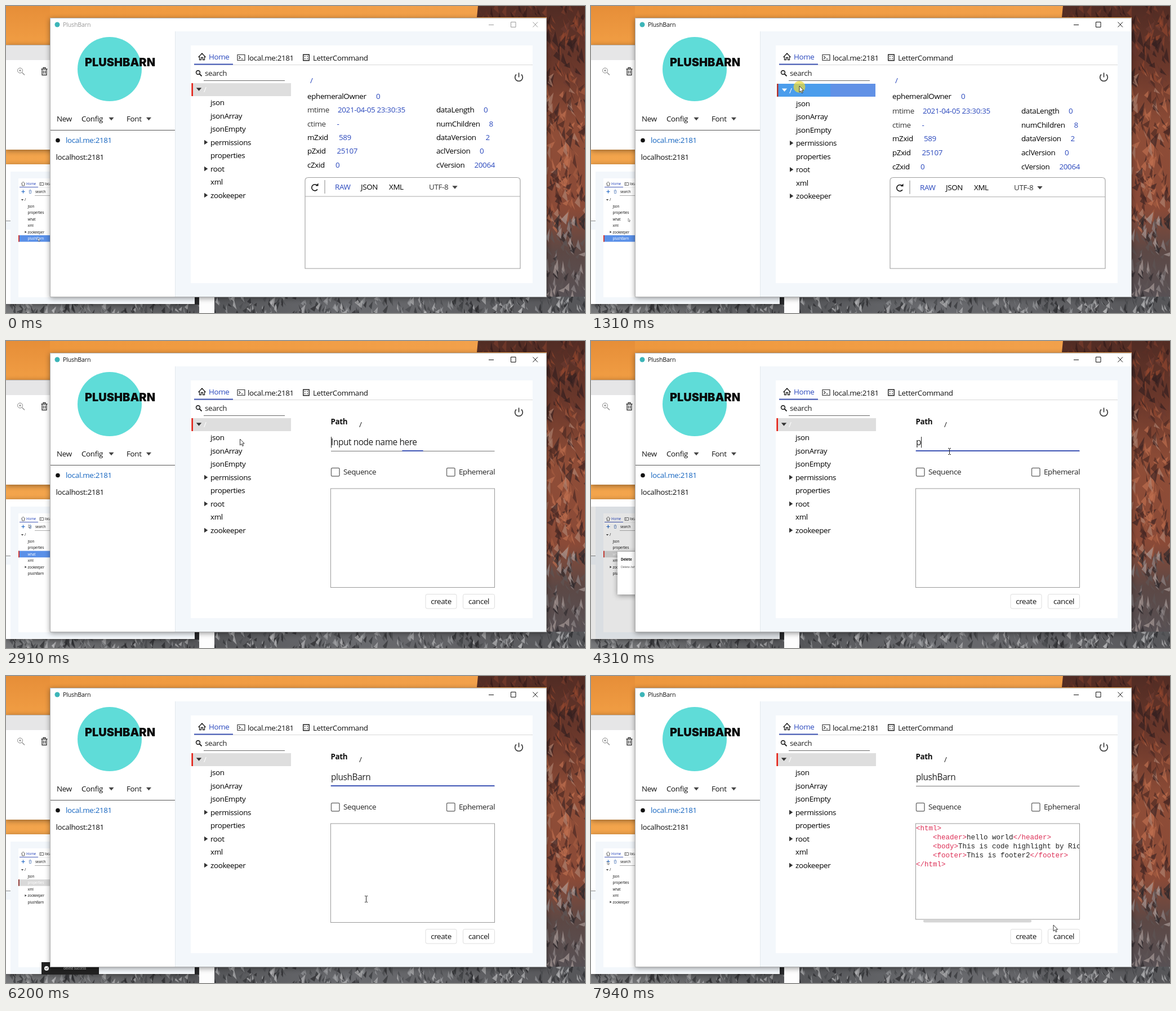
Recreate the animation shown at these times as an HTML page. Size 1028x545 px, loop 8000 ms.

```html
<!DOCTYPE html>
<html lang="en">
<head>
<meta charset="utf-8">
<title>Node browser</title>
<style>
  html, body { margin: 0; width: 100%; height: 100%; overflow: hidden; background: #fff; }
  svg { display: block; font-family: "Open Sans", "Noto Sans", sans-serif; }
  text { white-space: pre; }
  .ui { font-size: 13.4px; letter-spacing: -.35px; }
  .field { font-size: 15.4px; letter-spacing: -.4px; }
  .mini { font-size: 6.3px; letter-spacing: -.16px; }
  .code { font: 12.5px "Liberation Mono", "DejaVu Sans Mono", monospace; }
  .shadow { filter: drop-shadow(0 2px 5px rgba(0, 0, 0, .4)); }
</style>
</head>
<body>
<svg id="stage" width="1028" height="545" viewBox="0 0 1028 545"></svg>
<script>
const LOOP = 8000;
const NAME = 'PlushBarn';
const WORD = 'plushBarn';
const BLUE = '#2a48bd';
const ACCENT = '#3f55b5';
const INK = '#111';

// Markup helpers; y is the middle of the line of text
const rect = (x, y, w, h, fill, more = '') =>
  `<rect x="${x}" y="${y}" width="${w}" height="${h}" fill="${fill}" ${more}/>`;
const text = (x, y, s, fill = INK, cls = 'ui', more = '') =>
  `<text x="${x}" y="${y + (cls === 'mini' ? 2.3 : 4.8)}" class="${cls}" fill="${fill}" ${more}>${s}</text>`;
const line = (d, stroke = INK, width = 1, more = '') =>
  `<path d="${d}" fill="none" stroke="${stroke}" stroke-width="${width}" ${more}/>`;
const shape = (d, fill = INK, more = '') => `<path d="${d}" fill="${fill}" ${more}/>`;
const group = (id, body, more = '') => `<g id="${id}" ${more}>${body}</g>`;
const gradient = (id, dir, stops) =>
  `<linearGradient id="${id}" ${dir}>${stops.map(([o, c]) =>
    `<stop offset="${o}" stop-color="${c}"/>`).join('')}</linearGradient>`;
const down = (x, y, s, fill = '#444') => shape(`M${x - s} ${y - s / 2}h${2 * s}l${-s} ${s * 1.2}z`, fill);
const right = (x, y, s) => shape(`M${x} ${y - s}v${2 * s}l${s * 1.5} ${-s}z`, '#333');

let seed = 11;
const rnd = () => (seed = (seed * 16807) % 2147483647) / 2147483647;

// Slanted rock shards inside a box
function shards(x, y, w, h, count, size, tones) {
  let out = '';
  for (let i = 0; i < count; i++) {
    const px = x + rnd() * w, py = y + rnd() * h;
    const a = size * (rnd() - .35), b = size * (.5 + rnd());
    const c = size * (.2 + rnd() * .4);
    out += shape(`M${px.toFixed(1)} ${py.toFixed(1)}l${a.toFixed(1)} ${b.toFixed(1)}` +
      `l${(-c).toFixed(1)} ${(-b * .4).toFixed(1)}z`,
      tones[Math.floor(rnd() * tones.length)], 'opacity=".65"');
  }
  return out;
}

function backdrop() {
  return `<defs>
    ${gradient('sky', 'x2="1" y2="0"', [[0, '#ec963d'], [.3, '#f09b41'], [.85, '#f2a14c']])}
    ${gradient('glow', 'x2="0" y2="1"', [[0, '#e68e38'], [.2, '#ef9b42'], [1, '#f3a54d']])}
    ${gradient('cliff', 'x2="0" y2="1"', [[0, '#512c24'], [.2, '#6b382b'], [.4, '#8f4d37'],
      [.66, '#8a4a37'], [.8, '#5c4845'], [1, '#56545a']])}
    ${gradient('stone', 'x2="1" y2="0"', [[0, '#77787a'], [.35, '#545558'], [.6, '#6a6b6f'], [1, '#565659']])}
    <clipPath id="rocks"><path d="M838 0H1028V545H960V20H836z"/></clipPath>
    <clipPath id="floor"><path d="M0 516H1028V545H0z"/></clipPath>
    <clipPath id="area"><path d="M577 262H867V432H577z"/></clipPath>
    <clipPath id="rootRow"><path d="M332 138H505V161H332z"/></clipPath>
  </defs>` +
  rect(0, 0, 1028, 545, 'url(#sky)') +
  rect(0, 0, 78, 290, 'url(#glow)') +
  `<g clip-path="url(#rocks)">` + rect(830, 0, 198, 545, 'url(#cliff)') +
    shards(835, -10, 190, 30, 60, 16, ['#30191a', '#7a3c2b', '#5b2e25']) +
    shards(950, 10, 90, 120, 70, 20, ['#331f20', '#93472f', '#6b3a31']) +
    shards(950, 110, 90, 270, 190, 20, ['#4a2823', '#c07050', '#a65c41', '#3b2424', '#b08472']) +
    shards(950, 365, 90, 180, 130, 17, ['#2c282b', '#8f8788', '#5d5455', '#aa9c99']) + '</g>' +
  `<g clip-path="url(#floor)">` + rect(0, 516, 1028, 29, 'url(#stone)') +
    shards(0, 508, 1040, 34, 460, 13, ['#232427', '#9a9b9e', '#bcbcbd', '#47484b', '#2e2f32']) + '</g>' +
  rect(343, 510, 27, 35, '#fdfdfd') + rect(335, 510, 8, 20, '#2a2b2d');
}

function rearWindows() {
  return rect(0, 69, 90, 186, '#fff', 'class="shadow"') + rect(0, 69, 90, 27, '#e6e6e7') +
    line('M0 69.5H78', '#bbb') +
    `<circle cx="25" cy="114.500" r="4.500" fill="none" stroke="#888"/>` +
    line('M28.500 118L33 122.500M23 114.500H27M25 112.500V116.500', '#888', 1.1) +
    line('M62.500 112H73.500M66 111V109.500H70V111M64 112V122.500H72V112M66.500 114.500V120M69.500 114.500V120', '#333', 1.3) +
    rect(0, 281, 335, 248, '#fff', 'class="shadow"') +
    rect(8, 294, 327, 234, '#f3f7fb') + rect(22, 306, 290, 211, '#fff') +
    line('M0 381.500H8', '#888') + rect(0, 382, 8, 15, '#f3f7fb') +
    line('M27 315.500L30.500 312L34 315.500M28.500 315V319H32.500V315', '#333', .8) +
    text(36, 315.5, 'Home', BLUE, 'mini') + line('M24 321.500H57', ACCENT, 1) +
    line('M57 322H78', '#ddd', .6) +
    line('M60 313.500H66.500V318.500H60zM61.500 315L63 316L61.500 317', '#333', .7) +
    text(69, 316, 'local', INK, 'mini') +
    line('M27.500 329.500H33.500M30.500 326.500V332.500', '#2368c4', 1.2) +
    line('M40.500 328H45.500M41.500 328V332.500H44.500V328M42 326.500H44', '#6d8fc4', .9) +
    text(52, 329.5, 'search', INK, 'mini') + line('M51 336.500H78', '#777', .6) +
    down(29, 344, 2.2) + text(33, 344, '/', INK, 'mini') +
    group('miniRows', '') +
    group('dim', rect(0, 294, 335, 235, '#000', 'opacity=".1"') +
      rect(47, 374, 120, 76, '#fff', 'class="shadow"') +
      text(53, 388, 'Delete', INK, 'mini', 'font-weight="700"') +
      text(53, 401, 'Delete /what', '#555', 'mini', 'style="font-size:5.5px"')) +
    group('toast', rect(63, 508, 102, 22, '#222') +
      '<circle cx="72" cy="519" r="4" fill="#fff"/>' + line('M70 519L71.500 520.500L74 517.500', '#222') +
      text(102, 519, 'delete success', '#ddd', 'mini')) +
    group('miniClick', '<circle r="5.500" fill="#f2dc32" opacity=".75"/>') +
    group('miniArrow', arrow('scale(.5)'));
}

function arrow(transform = '') {
  return `<path d="M0 0V11L2.600 8.700L4.300 12.600L6.100 11.800L4.400 8H7.700z" fill="#fff" stroke="#222"
    stroke-width=".9" transform="${transform}"/>`;
}

const tree = ['json', 'jsonArray', 'jsonEmpty', '+permissions', 'properties', '+root', 'xml', '+zookeeper'];
const leftStats = [['mtime', '2021-04-05 23:30:35', 589], ['ctime', '-', 587.5], ['mZxid', '589', 591],
  ['pZxid', '25107', 587.5], ['cZxid', '0', 585]];
const rightStats = [['dataLength', '0', 848], ['numChildren', '8', 857.5], ['dataVersion', '2', 851.5],
  ['aclVersion', '0', 841], ['cVersion', '20064', 831.5]];

function chrome() {
  return rect(78, 21, 882, 496, '#fff', 'class="shadow"') +
    rect(301, 45, 659, 472, '#f3f7fb') + line('M300.500 45V517', '#e3e8ed') +
    line('M78.500 21.500H959.500V516.500H78.500z', '#8c8c8c', .7) +
    '<circle cx="91" cy="33" r="4.500" fill="#3cb5b8"/>' +
    group('title', text(101, 32, NAME, 'currentColor', '', 'font-size="10.600" letter-spacing="-.15"') +
      line('M857 33.500H866M896.500 28.500H905V37.500H896.500zM935.500 28.500L944 37.500M944 28.500L935.500 37.500', 'currentColor')) +
    '<circle cx="184" cy="112" r="57" fill="#5fdcd8"/>' +
    `<text x="202.500" y="107" text-anchor="middle" font-family="Inter, sans-serif" font-weight="900"
      font-size="20" fill="#0b0b0b">${NAME.toUpperCase()}</text>` +
    text(90, 200, 'New') + text(134, 200, 'Config') + down(187, 200, 4.5) +
    text(214, 200, 'Font') + down(253.5, 200, 4.5) + line('M79 220.500H300', '#555') +
    '<circle cx="92" cy="238.500" r="3.800" fill="#111"/>' +
    text(106, 238.5, 'local.me:2181', '#1565c0') + text(88.5, 268.5, 'localhost:2181') +
    rect(328, 70, 607, 422, '#fff') + line('M334 104.500H935', '#d9d9d9') + line('M334 103.500H403', ACCENT, 2) +
    line('M341.500 91L348 84L354.500 91M343.500 89.500V95.500H346.500V91.500H349.500V95.500H352.500V89.500', '#222', 1.3) +
    text(360, 90, 'Home', BLUE) +
    line('M411 86.500H424V96.500H411zM413.500 89L416 91.500L413.500 94M417.500 94H421', '#333', 1.2) +
    text(429, 92, 'local.me:2181') +
    line('M527.800 86.300H538.200V96.700H527.800z', '#222', 1.5) +
    line('M530 89.500H536M530 93.500H536', '#222', 1.6, 'stroke-dasharray="1.600 2.600"') +
    text(545, 92, 'LetterCommand') +
    '<circle cx="341" cy="118" r="3.400" fill="none" stroke="#222" stroke-width="1.600"/>' +
    line('M343.500 120.500L347.500 124.500', '#222', 1.9) +
    text(353, 119.5, 'search', '#222') + line('M351 132.500H495', '#666') +
    line('M906 121.500A6.800 6.800 0 1 0 915 121.500M910.500 118.500V126.500', '#444', 1.8);
}

function treeView() {
  return group('rootIdle', rect(330, 137, 176, 23, '#dedede') + rect(329.3, 137, 2.7, 23, '#e3241b')) +
    group('rootHot', rect(330, 138, 175, 23, '#6191e6') +
      '<g clip-path="url(#rootRow)"><rect id="ripple" x="332" y="138" height="23" fill="#4b9dec"/></g>' +
      rect(330, 138, 2.5, 23, '#b5332c')) +
    group('tree', '<g id="rootMark">' + down(342.5, 147.5, 4.7, 'currentColor') + '</g>' +
      text(351, 148.5, '/', '#fff') +
      tree.map((name, i) => {
        const y = 171.5 + 23.5 * i, open = name[0] === '+';
        return (open ? right(352, y, 4.2) : '') + text(363, y, name.replace('+', ''), '#000');
      }).join(''));
}

function details() {
  const stats = (list, x) => list.map(([label, value, vx], i) =>
    `<g data-row="${i}">` + text(x, 0, label, x < 600 && i < 2 ? '#333' : '#000') + text(vx, 0, value, BLUE) + '</g>').join('');
  return group('details', text(540, 132.5, '/', BLUE) +
    text(535, 160.5, 'ephemeralOwner', '#000') + text(657, 160.5, '0', BLUE) +
    stats(leftStats, 535) + stats(rightStats, 764) +
    line('M531 466V310Q531 304.500 537 304.500H907Q913 304.500 913 310V466z', '#9d9d9d', 1.1) +
    group('tools', line('M531 338H913', '#aaa') + line('M566 309V333', '#888') +
      line('M552.500 318.500A5.600 5.600 0 1 0 553 325.500', '#111', 1.6) +
      shape('M549.500 319.500H554.500V314.500z', '#111') +
      text(584, 321.5, 'RAW', BLUE) + text(630, 321.5, 'JSON', '#000') +
      text(680, 321.5, 'XML', '#000') + text(751, 321.5, 'UTF-8', '#333') + down(797, 321.5, 4.7)));
}

function form() {
  const box = x => rect(x, 225.5, 14.5, 14.5, '#fff', 'rx="2" stroke="#777" stroke-width="1.500"');
  const button = (x, w, s) => rect(x, 449.5, w, 25.5, '#fff', 'rx="3" stroke="#ddd"') +
    text(x + w / 2, 462.5, s, INK, 'ui', 'text-anchor="middle"');
  const tag = s => `<tspan fill="#dd2f56">${s.replace(/</g, '&lt;')}</tspan>`;
  const pad = '    ';
  const source = [tag('<html>'),
    pad + tag('<header>') + 'hello world' + tag('</header>'),
    pad + tag('<body>') + 'This is code highlight by RichTextFX' + tag('</body>'),
    pad + tag('<footer>') + 'This is footer2' + tag('</footer>'),
    tag('</html>')];
  return group('form', text(576.5, 143.5, 'Path', INK, 'ui', 'font-weight="700"') +
    text(627, 148.5, '/', '#222') +
    line('M577 195.500H867.500', '#777') + line('', ACCENT, 2, 'id="focus"') +
    text(577, 180.5, '', '#222', 'field', 'id="input"') +
    line('', '#222', 1, 'id="caret"') +
    box(577.5) + text(599, 232.5, 'Sequence', '#222') + box(782.5) + text(804, 232.5, 'Ephemeral', '#222') +
    rect(576.5, 262, 291, 175.5, '#fff', 'id="areaBox" stroke="#999"') +
    group('source', '<g clip-path="url(#area)">' + source.map((s, i) =>
      text(577, 270 + 16 * i - 1, s, '#222', 'code')).join('') + '</g>' +
      rect(590, 432.5, 192, 5, '#d6d6d6', 'rx="2.500"')) +
    button(745, 55, 'create') + button(811.5, 56, 'cancel'));
}

function overlays() {
  return group('menu', rect(370, 150, 87, 75, '#fff', 'class="shadow"') +
      line('M386.500 167.500H394M386.500 170.500H394M386.500 173.500H391M392.500 173.500H398.500M395.500 170.500V176.500', '#222', 1.3) +
      text(403.5, 170.5, 'add') +
      line('M388 200H397.500M391 199H394.500M389.500 201V209H396V201', '#222', 1.5) + text(403.5, 204.5, 'delete')) +
    group('click', '<circle r="10.500" fill="#ecd93a" opacity=".72"/>') +
    group('arrow', arrow()) +
    group('beam', line('M-2.500 -5.500H-.5M.5 -5.500H2.500M0 -5V5M-2.500 5.500H-.5M.5 5.500H2.500', '#222'));
}

const stage = document.getElementById('stage');
stage.innerHTML = backdrop() + rearWindows() + chrome() + treeView() + details() + form() + overlays();

const el = {};
stage.querySelectorAll('[id]').forEach(node => el[node.id] = node);
const statRows = [...stage.querySelectorAll('[data-row]')];

const show = (node, on) => node.style.display = on ? '' : 'none';
const move = (node, x, y) => node.setAttribute('transform', `translate(${x} ${y})`);
const clamp = v => Math.max(0, Math.min(1, v));
const within = (t, a, b) => t >= a && t < b;

// Eased position along [time, x, y] stops
function along(stops, t) {
  let i = 0;
  while (i < stops.length - 2 && t >= stops[i + 1][0]) i++;
  const [t0, x0, y0] = stops[i], [t1, x1, y1] = stops[i + 1];
  let k = clamp((t - t0) / (t1 - t0));
  k = k * k * (3 - 2 * k);
  return [x0 + (x1 - x0) * k, y0 + (y1 - y0) * k];
}

const pointer = [[750, 560, 300], [1270, 370, 142], [1700, 370, 142], [1900, 369, 150], [2190, 369, 150],
  [2540, 405, 168], [2760, 405, 168], [2900, 415.5, 174], [3070, 415.5, 174], [3700, 636, 196],
  [6040, 636, 196], [6200, 638.5, 396.5], [6500, 644, 384], [7250, 644, 384], [7710, 771, 397],
  [7790, 790, 412], [7940, 821, 442]];
const miniPointer = [[0, 57, 412], [450, 57, 412], [1230, 66, 377], [1800, 66, 377], [2050, 60, 377],
  [2270, 60, 377], [2850, 40, 326], [3850, 40, 326], [4250, 110, 436], [5500, 110, 436],
  [6910, 110, 400], [7700, 29, 329]];
const typedAt = [4310, 4470, 4630, 4790, 4910, 5030, 5180, 5260, 5410];

let miniKey = '';
function drawMini(t) {
  const removed = within(t, 5410, 6910), fresh = t >= 6910;
  const dialog = within(t, 3890, 5410);
  const names = ['json', 'properties', 'what', 'xml', '+zookeeper', WORD]
    .filter(n => !(removed && n === 'what') && !(fresh && n === WORD));
  const picked = fresh ? -1 : removed ? 1 : t < 2190 ? 5 : 2;
  const grey = removed || dialog;
  const key = [names.length, picked, grey, fresh].join();
  if (key !== miniKey) {
    miniKey = key;
    el.miniRows.innerHTML = names.map((name, i) => {
      const y = 355.5 + 11.45 * i, on = i === picked;
      return (on ? rect(22, y - 5.8, 60, 11.6, grey ? '#d9d9d9' : '#5a90e8') +
          rect(22, y - 5.8, 1.8, 11.6, removed ? '#8c2f2b' : '#d8322a') : '') +
        (name[0] === '+' ? right(33.5, y, 2) : '') +
        text(38.5, y, name.replace('+', ''), on ? '#fff' : INK, 'mini');
    }).join('');
  }
  show(el.dim, dialog);
  show(el.toast, within(t, 5500, 6750));
  const [x, y] = along(miniPointer, t);
  show(el.miniClick, within(t, 2080, 2270));
  move(el.miniClick, x, y);
  move(el.miniArrow, x, y);
}

function drawInput(t) {
  const count = typedAt.filter(at => t >= at).length;
  el.input.textContent = count ? WORD.slice(0, count) : 'Input node name here';
  const blink = within(t, 2830, 3330) || within(t, 3850, 5650) || within(t, 5880, 6120);
  const x = 577.5 + (count ? el.input.getComputedTextLength() : 0);
  el.caret.setAttribute('d', `M${x} 170V189.500`);
  show(el.caret, blink);
  const half = 145.3 * clamp((t - 2870) / 320);
  el.focus.setAttribute('d', `M${722 - half} 195H${722 + half}`);
  show(el.focus, within(t, 2870, 6480));
}

function draw(t) {
  const active = t >= 1310, editing = t >= 2830;
  const hot = active && !editing;
  el.title.style.color = active ? '#111' : '#999';

  show(el.rootIdle, !hot);
  show(el.rootHot, hot);
  el.ripple.setAttribute('width', 93 + 70 * clamp((t - 1310) / 800));
  el.rootMark.style.color = hot ? '#fff' : '#333';
  move(el.tree, hot ? 1 : 0, hot ? 1.3 : 0);

  show(el.details, !editing);
  statRows.forEach(row => move(row, 0,
    hot ? 186 + 24.7 * row.dataset.row : 184.5 + 24.35 * row.dataset.row));
  move(el.tools, 0, hot ? .8 : 0);

  show(el.form, editing);
  if (editing) drawInput(t);
  const pasted = t >= 6990;
  show(el.source, pasted);
  el.areaBox.setAttribute('height', pasted ? 170 : 175.5);

  show(el.menu, within(t, 1910, 2830));
  const [x, y] = along(pointer, t);
  const beam = editing && x > 576 && y < 432;
  show(el.arrow, t >= 750 && !beam);
  show(el.beam, beam);
  move(el.arrow, x, y);
  move(el.beam, Math.round(x) + .5, Math.round(y));
  show(el.click, within(t, 1310, 1550) || within(t, 2620, 2780));
  move(el.click, x, y + 1.500);

  drawMini(t);
}

const start = performance.now();
function tick() {
  draw((performance.now() - start) % LOOP);
  requestAnimationFrame(tick);
}
tick();
</script>
</body>
</html>
```
